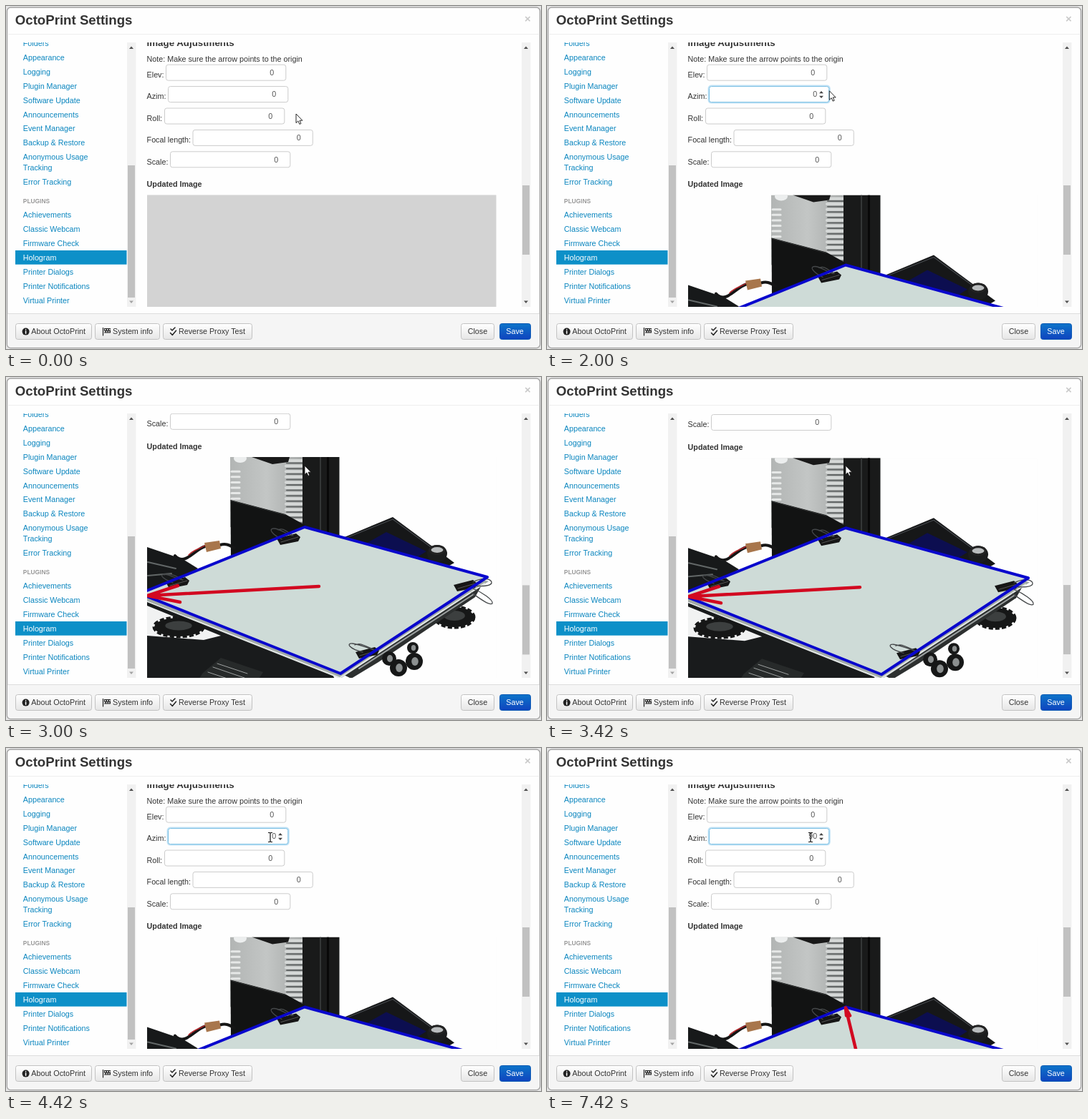
Recreate the animation shown at these times as an HTML page. Size 747 by 480 pixels, loop 8000 ms.

```html
<!DOCTYPE html>
<html lang="en">
<head>
<meta charset="utf-8">
<title>Settings dialog</title>
<style>
html, body { margin: 0; width: 100%; height: 100%; overflow: hidden; background: #e6e6e6; }
svg { display: block; width: 747px; height: 480px; }
text { font: 10.74px "Liberation Sans", Arial, sans-serif; fill: #333; white-space: pre; }
.bold { font-weight: bold; }
.link { fill: #0b86bf; }
.value { fill: #555; text-anchor: end; }
</style>
</head>
<body>
<svg id="stage" viewBox="0 0 747 480">
  <defs>
    <clipPath id="body"><rect x="0" y="51" width="747" height="370"/></clipPath>
    <clipPath id="photoBox"><rect x="197" y="112" width="487.5" height="330"/></clipPath>
    <linearGradient id="grey" x2="0" y2="1"><stop stop-color="#fff"/><stop offset="1" stop-color="#e6e6e6"/></linearGradient>
    <linearGradient id="blue" x2="0" y2="1"><stop stop-color="#0c74c9"/><stop offset="1" stop-color="#1044bf"/></linearGradient>
    <linearGradient id="silver"><stop stop-color="#b2b5b4"/><stop offset=".5" stop-color="#c3c6c5"/><stop offset="1" stop-color="#a5a8a7"/></linearGradient>
  </defs>
  <rect x="1.5" y="2" width="744" height="476.5" rx="5" fill="#fefefe" stroke="#a2a2a2" stroke-width="1.4"/>
  <path d="M2.2 430.5H744.8V473a5 5 0 0 1-5 4.8H7a5 5 0 0 1-4.8-4.8Z" fill="#f5f5f5"/>
  <path d="M2 39.5H745" stroke="#eee"/>
  <path d="M2 430.5H745" stroke="#ddd"/>
  <text class="bold" x="12.8" y="26" style="font-size:18.65px">OctoPrint Settings</text>
  <text class="bold" x="728.3" y="23" text-anchor="middle" style="font-size:15px;fill:#c9c9c9">×</text>
  <g id="side" clip-path="url(#body)"></g>
  <g clip-path="url(#body)">
    <g id="content">
      <text class="bold" x="196.6" y="56" style="font-size:13.3px">Image Adjustments</text>
      <text x="196.6" y="78">Note: Make sure the arrow points to the origin</text>
      <g id="fields"></g>
      <g id="spin">
        <rect id="spinBg" x="377.5" y="117" width="11" height="14" fill="#d9d9d9"/>
        <path d="M380 122.2l3-3.2 3 3.2ZM380 125.8l3 3.2 3-3.2Z" fill="#444"/>
      </g>
      <path id="caret" stroke="#222"/>
      <text class="bold" x="196.6" y="253">Updated Image</text>
      <rect id="blank" x="197" y="264.5" width="487.5" height="330" fill="#d3d3d3"/>
      <g id="photo" transform="translate(0 152.5)"><g id="shapes" clip-path="url(#photoBox)"></g></g>
    </g>
  </g>
  <g id="bars"></g>
  <rect id="thumb" x="721" width="10" height="97" fill="#c1c1c1"/>
  <g id="buttons"></g>
  <path id="pointer" d="M0 0V12.6L2.9 9.9 4.9 14.4 6.9 13.5 5 9.2H8.9Z" fill="#fff" stroke="#111" stroke-width=".9"/>
  <path id="beam" d="M-3-6.5H-1L0-5.7 1-6.5H3M-3 6.5H-1L0 5.7 1 6.5H3M0-5.7V5.7" fill="none" stroke="#111" stroke-width="1.2"/>
</svg>
<script>
const $ = id => document.getElementById(id);
const text = (x, y, s, attrs = '') => `<text x="${x}" y="${y}" ${attrs}>${s}</text>`;
const rect = (x, y, w, h, attrs) => `<rect x="${x}" y="${y}" width="${w}" height="${h}" ${attrs}/>`;
const poly = (points, fill) => `<polygon points="${points}" fill="${fill}"/>`;
const line = (d, stroke, width = 1) =>
  `<path d="${d}" fill="none" stroke="${stroke}" stroke-width="${width}" stroke-linecap="round" stroke-linejoin="round"/>`;
const oval = (x, y, rx, ry, fill, attrs = '') => `<ellipse cx="${x}" cy="${y}" rx="${rx}" ry="${ry}" fill="${fill}" ${attrs}/>`;

function buildSide() {
  const column = (names, y) => names.map((s, i) => text(23.8, y + i * 19.85, s, 'class="link"')).join('');
  $('side').innerHTML =
    column(['Folders', 'Appearance', 'Logging', 'Plugin Manager', 'Software Update', 'Announcements',
      'Event Manager', 'Backup &amp; Restore', 'Anonymous Usage'], 56.3) +
    text(23.8, 230.2, 'Tracking', 'class="link"') +
    text(23.8, 250, 'Error Tracking', 'class="link"') +
    text(23.8, 275.7, 'PLUGINS', 'class="bold" style="font-size:8.4px;fill:#999"') +
    rect(13, 342, 155.5, 19.7, 'fill="#0d90c8"') +
    column(['Achievements', 'Classic Webcam', 'Firmware Check'], 296.4) +
    text(23.8, 356, 'Hologram', 'style="fill:#fff"') +
    column(['Printer Dialogs', 'Printer Notifications', 'Virtual Printer'], 375.8);
}

function buildFields() {
  const rows = [['Elev', 223.5], ['Azim', 226.5], ['Roll', 221.5], ['Focal length', 261], ['Scale', 229.5]];
  $('fields').innerHTML = rows.map(([name, x], i) => {
    const y = 82.2 + i * 30.4;
    return text(196.6, y + 17.8, name + ':') +
      rect(x - 1, y - 1, 169.3, 24, `id="glow${i}" rx="4" fill="none" stroke="#c3e3f6" stroke-width="2" visibility="hidden"`) +
      rect(x, y, 167.3, 22, `id="box${i}" rx="3" fill="#fff" stroke="#ccc"`) +
      text(x + 150.8, y + 14.8, '0', `class="value" id="value${i}"`);
  }).join('');
}

function buildBars() {
  const bar = (x, low) => rect(x, 51, 12.5, 370, 'fill="#f1f1f1"') +
    poly(`${x + 3},60 ${x + 6},56.5 ${x + 9},60`, '#505050') +
    poly(`${x + 3},412.5 ${x + 6},416 ${x + 9},412.5`, low);
  $('bars').innerHTML = bar(169, '#a3a3a3') + bar(720, '#505050') + rect(170, 223, 10, 185, 'fill="#c1c1c1"');
}

function buildButtons() {
  const button = (x, w, tx, s, fill = 'grey', ink = '#333') =>
    rect(x + .5, 444.5, w - 1, 22, `rx="3" fill="url(#${fill})" stroke="${fill == 'blue' ? '#0b58b4' : '#c2c2c2'}"`) +
    text(tx, 459.3, s, `style="fill:${ink}"`);
  let flag = line('M135.5 450.5V461', '#222', 1.2) + rect(137, 451, 9, 6.5, 'fill="#222"');
  for (let i = 0; i < 6; i++) flag += rect(138 + i % 3 * 3 - (i > 2 ? 1 : 0), i > 2 ? 454.8 : 452, 1.5, 1.7, 'fill="#fff"');
  $('buttons').innerHTML = button(13, 107, 35.3, 'About OctoPrint') + button(124, 91, 149, 'System info') +
    button(219, 125, 241, 'Reverse Proxy Test') + button(635, 47, 644.7, 'Close') +
    button(689, 44, 698.3, 'Save', 'blue', '#fff') +
    oval(27.6, 455.6, 5, 5, '#222') + line('M27.6 455V458.3M27.6 452.7V453', '#fff', 1.5) + flag +
    line('M229.5 457.5l2.8 3 5.2-6.3M230 452l2 2 4-4', '#222', 1.5);
}

function buildPhoto() {
  const clip = (x, y, loops) =>
    `<g transform="translate(${x} ${y})">` +
    poly('-17,0 10,-7 16,-2 13,4 -12,9', '#161616') + line('M-11 5L13-2', '#555') + line(loops, '#45484a', 1.3) + '</g>';
  const gear = (x, y, rx, ry) =>
    oval(x, y, rx, ry, '#161717', 'stroke="#161717" stroke-width="5" stroke-dasharray="6 3"') +
    oval(x, y - 2, rx * .55, ry * .5, '#3c3f3f');
  const roller = (x, y, r) => oval(x, y, r, r, '#161717') + oval(x + 1, y, r * .4, r * .5, '#8b8f8f');
  let fins = '';
  for (let y = 117; y < 204; y += 7.6) {
    fins += line(`M391 ${y}H413`, '#d5d8d7', 4) + line(`M392 ${y + 3.6}H414`, '#646868', 2);
    if (y > 130 && y < 172) fins += line(`M315 ${y}H326`, '#e6e8e7', 3);
  }
  $('shapes').innerHTML =
    rect(197, 112, 488, 330, 'fill="#fefefe"') +
    rect(313, 112, 102, 98, 'fill="url(#silver)"') + fins +
    oval(327, 114, 9, 6, '#eceeee') + poly('343,112 396,112 394,119 372,122', '#191919') +
    // tower and box
    rect(414, 112, 51.5, 130, 'fill="#191a1a"') + rect(438, 112, 2, 115, 'fill="#343737"') +
    rect(448, 112, 3, 118, 'fill="#080808"') +
    poly('313.5,172 390,192 417,207 420,216 314,257', '#121313') + line('M314 173L390 193', '#333535') +
    // cable
    line('M236 250C250 265 262 242 278 237M299 235C309 232 314 237 319 239', '#151515', 4) +
    line('M255 249C263 241 270 241 279 235', '#b6252a', 1.5) +
    poly('277,232 298,229 300,240 280,245', '#a8764c') +
    // display
    poly('468,226 540,196 626,260 612,268 575,265', '#161718') + line('M473 226L540 199 596 240', '#43464a', 1.3) +
    poly('501,234 531,217 587,244 566,257', '#0c0e50') +
    oval(602, 247, 14, 12, '#1b1c1d') + oval(602, 242, 10, 5.5, '#b9bcbd', 'stroke="#222" stroke-width="3"') +
    // frame under the bed
    poly('197,238 247,255 268,268 232,289 197,304', '#17191a') +
    line('M198 259L237 268M198 278L231 275', '#626767', 2) +
    poly('197,309 455,415 470,442 197,442', '#191b1c') + poly('197,320 300,362 276,368 197,362', '#f1f2f2') +
    gear(241, 350, 34, 13) +
    poly('275,414 300,393 359,413 340,442 256,442', '#272a2a') +
    line('M295 401L337 415M289 406L333 421M282 413L315 424', '#9da0a0', 1) +
    gear(626, 336, 27, 14) +
    poly('666,288 655,308 520,399 482,422 468,415', '#2d3030') + line('M653 304L493 408', '#9ca1a1', 2) +
    roller(568, 379, 8) + roller(535, 394, 10) + roller(570, 398, 12) + roller(548, 407, 12) +
    // bed
    poly('187,309 467,422 674,286 417,213', '#a2aaa7') + poly('187,303 417,210 672,280 467,415', '#cedbd7') +
    line('M187 310L466 421 668 289', '#e4e8e6', 2) +
    clip(395, 226, 'M-10 1C-24-6-29-14-21-14C-13-14-7-8 4-4M6-4C-6-12-9-15-15-12') +
    clip(240, 287, 'M-7 1C-24-6-26-11-18-11C-10-10-4-5 7-3M5-4C-4-10-12-13-19-10') +
    clip(642, 291, 'M10-4C22-11 37-9 36-3C35 2 22 2 10 1M10 5C22 10 39 21 37 26C33 29 21 20 8 11') +
    clip(505, 385, 'M-7 0C-27-5-30-13-21-12C-11-11 2-5 9-3M8-4C-5-9-10-14-18-10') +
    '<path d="M187 303L417 210 672 280 467 415Z" fill="none" stroke="#0907cd" stroke-width="4" stroke-linejoin="round"/>' +
    '<path id="arrow" fill="none" stroke="#d20920" stroke-width="4.5" stroke-linecap="round"/>';
}

const tween = (t, a, b) => Math.min(1, Math.max(0, (t - a) / (b - a)));
const easeOut = x => 1 - (1 - x) ** 3;

// time, x, y
const path = [[80, 405, 151], [830, 384, 126], [1250, 386, 123], [1420, 386, 123], [1500, 385, 117],
  [1920, 385, 117], [2200, 417, 123], [2750, 417, 123], [3000, 417, 124], [3420, 417, 124], [3580, 405, 126],
  [4170, 381, 124], [4420, 369, 125], [7100, 369, 125], [7170, 368, 125]];

function cursorAt(t) {
  const i = path.findIndex(p => p[0] > t);
  if (i == 0) return path[0].slice(1);
  if (i < 0) return path[path.length - 1].slice(1);
  const [a, b] = [path[i - 1], path[i]], k = tween(t, a[0], b[0]);
  return [a[1] + (b[1] - a[1]) * k, a[2] + (b[2] - a[2]) * k];
}

const show = (id, on) => $(id).setAttribute('visibility', on ? 'visible' : 'hidden');

function draw(t) {
  const scroll = 152.5 * (easeOut(tween(t, 2014, 2524)) - easeOut(tween(t, 3420, 3782)));
  $('content').setAttribute('transform', `translate(0 ${-scroll})`);
  $('thumb').setAttribute('y', 251 + scroll * .265);

  const [x, y] = cursorAt(t), localY = y + scroll;
  const inside = x > 226 && x < 394 && localY > 112 && localY < 135;
  const overSpin = inside && x >= 377, beam = inside && !overSpin;
  const focused = t >= 920;
  show('pointer', !beam);
  show('beam', beam);
  for (const id of ['pointer', 'beam']) $(id).setAttribute('transform', `translate(${x} ${y})`);

  show('glow1', focused);
  $('box1').setAttribute('stroke', focused ? '#75bde3' : '#ccc');
  show('spin', focused || inside);
  show('spinBg', overSpin && t < 1920);

  const turned = t >= 6420;
  $('value1').textContent = t >= 1250 && t < 1500 ? '-0.01' : turned ? '90' : '0';
  const caretOn = t >= 1000 && t < 1500 || t >= 4920 && t < 7420 && Math.floor((t - 4920) / 500) % 2 == 0;
  show('caret', caretOn);
  $('caret').setAttribute('d', `M${t < 4000 ? 377.5 : 371.2} 117.5V130`);

  const loaded = t >= 1590;
  show('blank', !loaded);
  $('photo').style.display = loaded ? '' : 'none';
  $('arrow').setAttribute('d', t >= 6500
    ? 'M437 293L417 211M417 211L418 222M417 211L423 222'
    : 'M437 293L197 306M197 306L240 292M197 306L243 315');
}

buildSide();
buildFields();
buildBars();
buildButtons();
buildPhoto();

function frame() {
  draw(performance.now() % 8000);
  requestAnimationFrame(frame);
}
frame();
</script>
</body>
</html>
```
